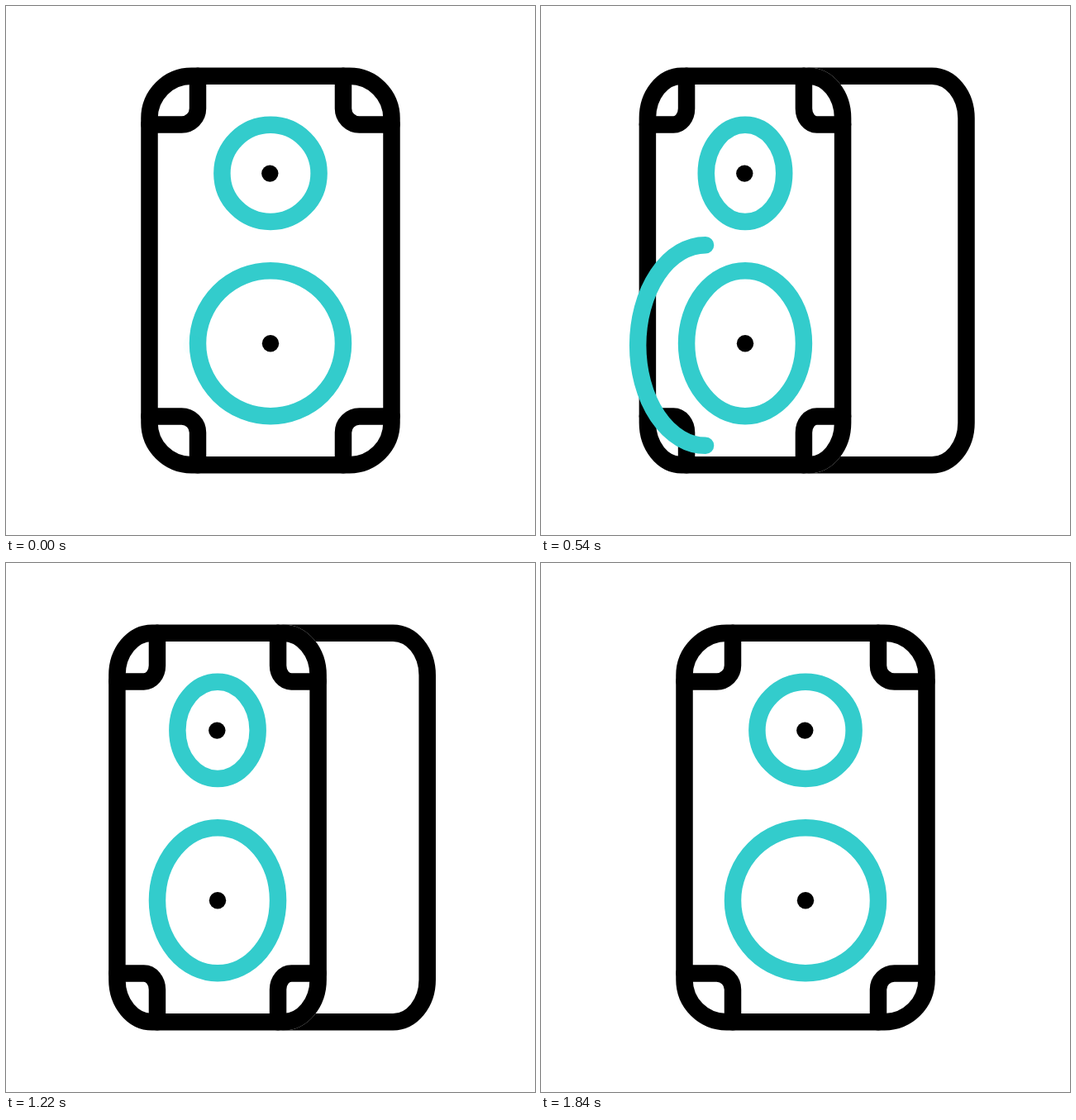
Write an HTML page with a canvas that moves like this. It is 640 px wide and 640 px high and loops after 2400 ms.

```html
<!DOCTYPE html>
<html lang="en">
<head>
<meta charset="utf-8">
<title>Speaker</title>
<style>
  html, body { margin: 0; width: 100%; height: 100%; overflow: hidden; background: #fff; }
  canvas { display: block; width: 640px; height: 640px; }
</style>
</head>
<body>
<canvas id="stage" width="640" height="640"></canvas>
<script>
const ctx = document.getElementById('stage').getContext('2d');
const LOOP = 2400, OPENED = 300, CLOSED = 1840, WAVE_GAP = 380;
const LINE = 20.5, TEAL = '#33cccc';
const TOP = 84.7, BOTTOM = 555.3, HALF = 146.5, CORNER = 51;

const lerp = (a, b, u) => a + (b - a) * u;
const progress = (t, from, to) => Math.min(1, Math.max(0, (t - from) / (to - from)));
const smooth = u => u * u * (3 - 2 * u);

// 1 = seen from the front, 0 = turned aside: quick opening, slow drift, quick return
function frontness(t) {
  const opening = 1 - smooth(progress(t, 0, OPENED));
  const drift = progress(t, 450, CLOSED);
  const turn = progress(t, 1160, CLOSED) ** 2;
  return Math.max(opening, lerp(turn, drift, 0.236));
}

// Far edge of the body, hidden behind the face at both ends
function farEdge(t) {
  const opening = smooth(progress(t, 0, OPENED));
  const closing = progress(t, 400, CLOSED) ** 5.8;
  return lerp(390, 514.5, opening - closing);
}

function stroke(color) {
  ctx.strokeStyle = color;
  ctx.stroke();
}

// Builds a path in squeezed face space, leaving the line width unsqueezed
function facePath(mid, squeeze, build) {
  ctx.save();
  ctx.translate(mid, 0);
  ctx.scale(squeeze, 1);
  ctx.beginPath();
  build();
  ctx.restore();
}

function dot(x, y) {
  ctx.beginPath();
  ctx.arc(x, y, 10.2, 0, Math.PI * 2);
  ctx.fillStyle = '#000';
  ctx.fill();
}

function drawBody(start, far) {
  const rx = 41.5;
  ctx.beginPath();
  ctx.moveTo(start, TOP);
  ctx.ellipse(far - rx, TOP + CORNER, rx, CORNER, 0, -Math.PI / 2, 0);
  ctx.ellipse(far - rx, BOTTOM - CORNER, rx, CORNER, 0, 0, Math.PI / 2);
  ctx.lineTo(start, BOTTOM);
  stroke('#000');
}

function drawFace(mid, squeeze) {
  facePath(mid, squeeze, () =>
    ctx.roundRect(-HALF, TOP, HALF * 2, BOTTOM - TOP, CORNER));
  ctx.fillStyle = '#fff';
  ctx.fill();
  stroke('#fff');
  stroke('#000');

  for (const sx of [-1, 1]) {
    for (const sy of [-1, 1]) {
      const edge = sy < 0 ? TOP : BOTTOM;
      const y = edge - sy * 58.8;
      facePath(mid, squeeze, () => {
        ctx.moveTo(sx * 88, edge);
        ctx.lineTo(sx * 88, y + sy * 19.5);
        ctx.bezierCurveTo(sx * 88, y + sy * 8.7, sx * 96.7, y, sx * 107.5, y);
        ctx.lineTo(sx * HALF, y);
      });
      stroke('#000');
    }
  }

  for (const [y, r] of [[202.4, 58.6], [408.2, 88]]) {
    facePath(mid, squeeze, () => ctx.arc(0, y, r, 0, Math.PI * 2));
    stroke(TEAL);
  }
  dot(mid - 0.7, 202.6);
  dot(mid, 408.2);
}

// A wave swells out of the cone, then slides away and fades
function drawWave(t) {
  if (t <= 0) return;
  const swell = 141.7 * (1 - Math.exp(-t / 83));
  const slide = Math.max(0, (t - 360) / 180);
  const alpha = Math.min(1, t / 40) * (1 - 0.97 * slide ** 6);
  if (alpha <= 0) return;
  const ry = swell + 19 * slide ** 4;
  const rx = ry * (0.675 - 0.08 * slide);
  const x = 226 - 0.222 * swell - 47 * slide;
  ctx.globalAlpha = alpha;
  ctx.beginPath();
  ctx.ellipse(x, 410.5, rx, ry, 0, Math.PI / 2, Math.PI * 1.5);
  stroke(TEAL);
  ctx.globalAlpha = 1;
}

function draw(t) {
  ctx.fillStyle = '#fff';
  ctx.fillRect(0, 0, 640, 640);
  ctx.lineWidth = LINE;
  ctx.lineCap = 'round';
  const front = frontness(t), far = farEdge(t);
  const left = lerp(128.2, 173.5, front);
  const right = lerp(363.5, 466.5, front);
  const squeeze = (right - left) / (HALF * 2);
  if (far > right) drawBody(right - CORNER * squeeze, far);
  drawFace((left + right) / 2, squeeze);
  drawWave(t);
  drawWave(t - WAVE_GAP);
}

const begin = performance.now();
function tick() {
  draw((performance.now() - begin) % LOOP);
  requestAnimationFrame(tick);
}
tick();
</script>
</body>
</html>
```
